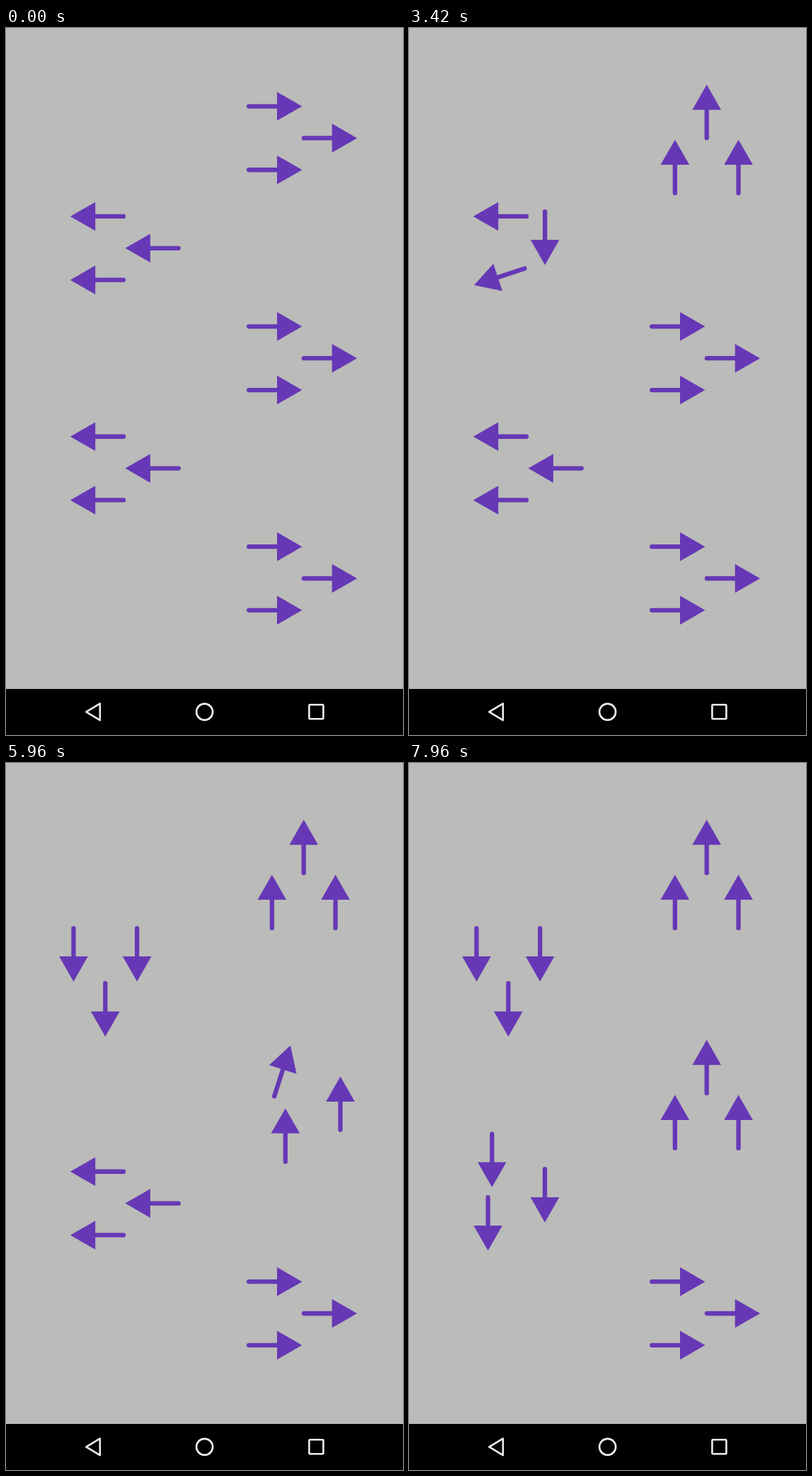
Write an HTML page that moves like this. It is 561 px wide and 998 px high and loops after 8 s.

```html
<!DOCTYPE html>
<html lang="en">
<head>
<meta charset="utf-8">
<title>Turning arrows</title>
<style>
  html, body { margin: 0; width: 100%; height: 100%; overflow: hidden; background: #bbbbb9; }
  svg { display: block; width: 561px; height: 998px; }
</style>
</head>
<body>
<svg viewBox="0 0 561 998">
  <defs>
    <g id="arrow">
      <path d="M-51.6 0H-10" stroke="#6638b6" stroke-width="6.3" stroke-linecap="round"/>
      <path d="M23.6 0L-11.8 -20.3V20.3Z" fill="#6638b6"/>
    </g>
  </defs>
  <rect width="561" height="998" fill="#bbbbb9"/>
  <g id="stage"></g>
  <rect y="933" width="561" height="65" fill="#000"/>
  <g fill="none" stroke="#efeeec" stroke-width="2.6" stroke-linejoin="round">
    <path d="M113.3 965.4L132.8 953.7V977.1Z"/>
    <circle cx="280.6" cy="965.4" r="11.5"/>
    <rect x="428.4" y="955.3" width="20" height="20" rx="1"/>
  </g>
</svg>
<script>
const LOOP = 8000, RADIUS = 51.8, STEP = 155.4;

// start: first turn begins; turn: time per arrow; end: formation is in place
const groups = [
  { start: 973, turn: 374, spin: 374, end: 2400 },
  { start: 2975, turn: 371, spin: 332, end: 4420 },
  { start: 4918, turn: 372, spin: 381, end: 6415 },
  { start: 6827, turn: 373, spin: 373, end: 8319 },
  { start: Infinity, turn: 373, spin: 373, end: Infinity }
];

const stage = document.getElementById("stage");
const clamp = v => Math.max(0, Math.min(1, v));

groups.forEach((g, i) => {
  g.left = i % 2 === 1;
  g.x = g.left ? 140.3 : 420.7;
  g.y = STEP * (i + 1);
  g.arrows = [0, 1, 2].map(() => {
    const use = document.createElementNS("http://www.w3.org/2000/svg", "use");
    use.setAttribute("href", "#arrow");
    return stage.appendChild(use);
  });
});

function draw(t) {
  for (const g of groups) {
    const spun = t >= g.end ? 1 : clamp((t - g.start - 3 * g.turn) / g.spin);
    const shift = 90 * spun * (g.left ? 1 : -1);
    g.arrows.forEach((arrow, k) => {
      const turned = clamp((t - g.start - k * g.turn) / g.turn);
      const a = (120 * k + shift) * Math.PI / 180;
      const x = g.x + RADIUS * Math.cos(a);
      const y = g.y + RADIUS * Math.sin(a);
      const heading = (g.left ? 180 : 0) - 90 * turned;
      arrow.setAttribute("transform",
        `translate(${x.toFixed(2)} ${y.toFixed(2)}) rotate(${heading.toFixed(2)})`);
    });
  }
}

const begin = performance.now();
function tick() {
  draw((performance.now() - begin) % LOOP);
  requestAnimationFrame(tick);
}
tick();
</script>
</body>
</html>
```
